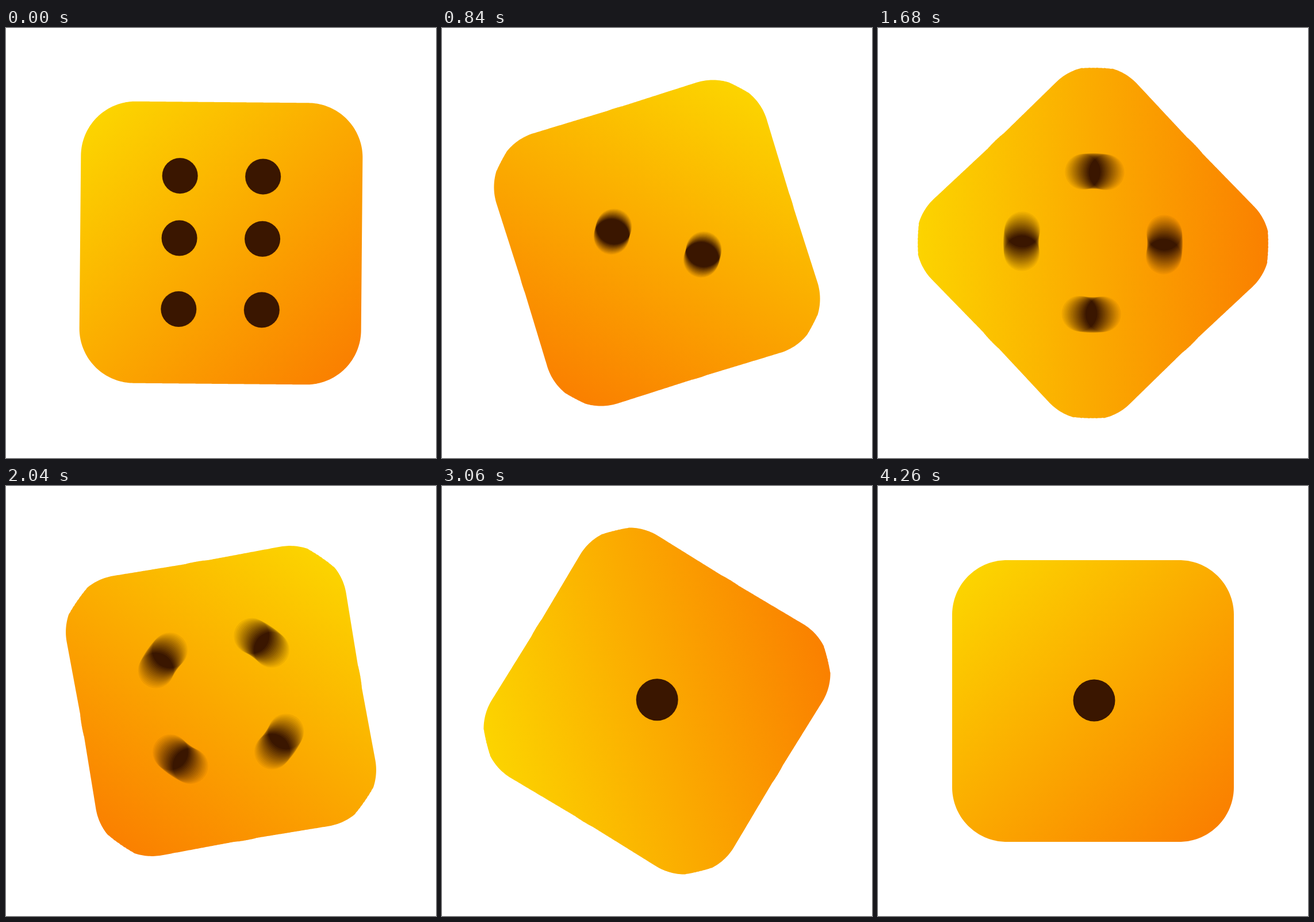
Recreate the animation shown at these times as an HTML page with a canvas. Size 748 by 748 pixels, loop 4440 ms.

```html
<!DOCTYPE html>
<html lang="en">
<head>
<meta charset="utf-8">
<title>Rolling die</title>
<style>
html, body { margin: 0; height: 100%; overflow: hidden; background: #fff; }
canvas { display: block; }
</style>
</head>
<body>
<canvas id="stage" width="748" height="748"></canvas>
<script>
const SIZE = 748, MID = SIZE / 2, HALF = 245, RADIUS = 95;
const STEP = 60, LOOP = 4440, LAST = 71;
const TURN = 3960, SHUTTER = 0.24, SAMPLES = 16;

// [step, degrees turned so far]
const poses = [[0, 0.5], [14, 432.7], [22, 945], [34, 1880.1], [44, 2655], [59, 3654.8], [LAST, TURN]];

const pips = (r, ...spots) => ({ r, spots });
const one = pips(36.5, [2, -1]);
const two = pips(31, [-42, 68], [43, -70]);
const four = pips(31, [-88.5, -88.5], [88.5, -88.5], [-88.5, 88.5], [88.5, 88.5]);
const six = pips(31, [-72.5, -116.2], [72, -116.2], [-72.5, -7.8], [72, -7.8], [-72.5, 115.7], [72, 115.7]);
// [first step, face]
const faces = [[0, six], [7, two], [18, four], [39, two], [51, one]];

const ctx = document.getElementById('stage').getContext('2d');
const layer = document.createElement('canvas');
layer.width = layer.height = SIZE;
const ink = layer.getContext('2d');

const rad = deg => deg * Math.PI / 180;
const ease = x => x * x * (3 - 2 * x);
const unease = s => 0.5 - Math.sin(Math.asin(1 - 2 * s) / 3);

// One long ease in and out, passing through the poses
function angleAt(step) {
  const s = Math.min(LAST, Math.max(0, step));
  const k = poses.findIndex((p, n) => n > 0 && s <= p[0]);
  const [a, from] = poses[k - 1], [b, to] = poses[k];
  const x0 = unease(from / TURN), x1 = unease(to / TURN);
  return rad(TURN * ease(x0 + (x1 - x0) * (s - a) / (b - a)));
}

// Distance from the centre to the edge of the rounded square
function reach(angle) {
  const quarter = Math.PI / 2;
  const a = Math.abs(((angle % quarter) + quarter) % quarter - quarter / 2);
  const side = quarter / 2 - a, inner = HALF - RADIUS;
  if (HALF * Math.tan(side) <= inner) return HALF / Math.cos(side);
  const d = inner * Math.SQRT2;
  return d * Math.cos(a) + Math.sqrt(RADIUS ** 2 - (d * Math.sin(a)) ** 2);
}

// Hard outline of the blurred body: the median edge over the open shutter
function drawBody(angle, turns) {
  const g = ctx.createLinearGradient(-217, -217, 217, 217);
  g.addColorStop(0, '#fcd400');
  g.addColorStop(1, '#fa8000');
  ctx.save();
  ctx.translate(MID, MID);
  ctx.rotate(angle);
  ctx.beginPath();
  for (let n = 0; n < 720; n++) {
    const a = rad(n / 2);
    const edges = turns.map(t => reach(a + angle - t)).sort((p, q) => p - q);
    const d = edges[SAMPLES / 2];
    ctx.lineTo(d * Math.cos(a), d * Math.sin(a));
  }
  ctx.fillStyle = g;
  ctx.fill();
  ctx.restore();
}

function drawPips({ r, spots }, turns) {
  ink.clearRect(0, 0, SIZE, SIZE);
  ink.globalCompositeOperation = 'lighter';
  ink.globalAlpha = 1 / SAMPLES;
  ink.fillStyle = '#fff';
  for (const t of turns) {
    const c = Math.cos(t), s = Math.sin(t);
    for (const [x, y] of spots) {
      ink.beginPath();
      ink.arc(MID + x * c - y * s, MID + x * s + y * c, r, 0, 2 * Math.PI);
      ink.fill();
    }
  }
  ink.globalCompositeOperation = 'source-in';
  ink.globalAlpha = 1;
  ink.fillStyle = '#3a1600';
  ink.fillRect(0, 0, SIZE, SIZE);
  ctx.drawImage(layer, 0, 0);
}

function draw(step) {
  const turns = Array.from({ length: SAMPLES }, (_, k) =>
    angleAt(step + (k / (SAMPLES - 1) - 0.5) * SHUTTER));
  ctx.fillStyle = '#fff';
  ctx.fillRect(0, 0, SIZE, SIZE);
  drawBody(angleAt(step), turns);
  drawPips(faces.filter(f => f[0] <= step).pop()[1], turns);
}

let shown = -1;
function tick() {
  const step = Math.min(LAST, Math.floor(performance.now() % LOOP / STEP));
  if (step !== shown) draw(shown = step);
  requestAnimationFrame(tick);
}
tick();
</script>
</body>
</html>
```
